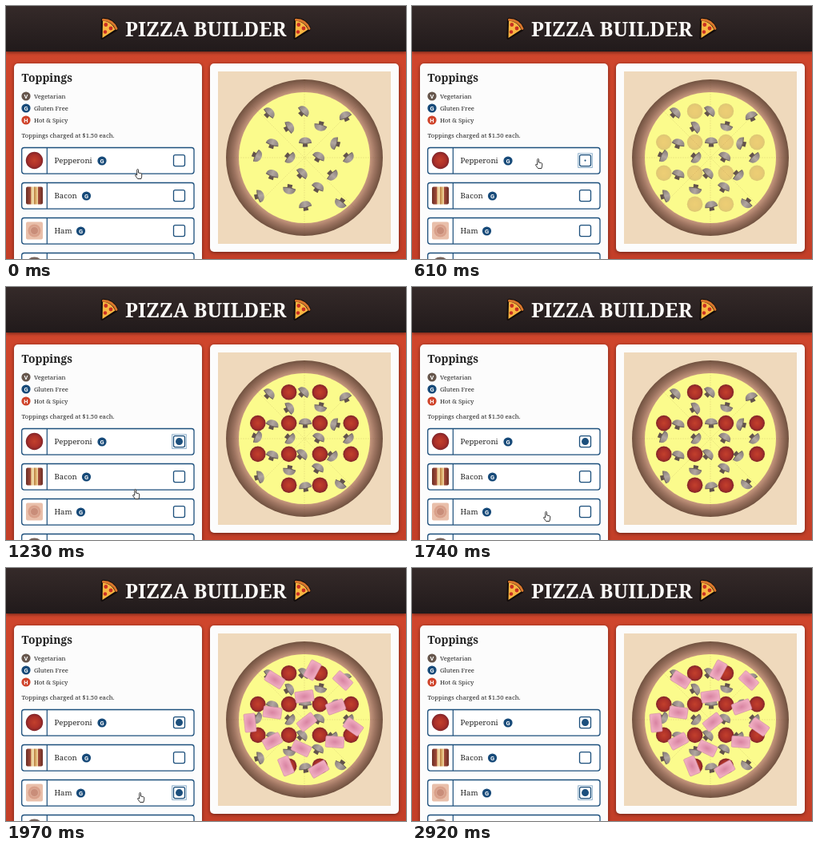
Animation, 500 px wide and 317 px high, one loop 3.33 s. Source, as an HTML page:

```html
<!DOCTYPE html>
<html lang="en">
<head>
<meta charset="utf-8">
<title>Pizza Builder</title>
<style>
  html, body { margin: 0; width: 100%; height: 100%; overflow: hidden; background: #cb432a; }
  svg { display: block; width: 500px; height: 317px; }
  text { font-family: "Noto Serif", serif; fill: #222; }
  .small { font-size: 7.7px; }
  .name { font-size: 9.6px; }
  .badge { font: bold 7.5px Roboto, sans-serif; fill: #fff; text-anchor: middle; }
  .box { fill: #fff; stroke: #1c4f7c; stroke-width: 1.3; }
  .panel { fill: #fcfcfc; filter: drop-shadow(0 1px 2px #0007); }
</style>
</head>
<body>
<svg viewBox="0 0 500 317">
  <defs>
    <linearGradient id="wall" x2="0" y2="1"><stop stop-color="#d2472d"/><stop offset="1" stop-color="#c33f28"/></linearGradient>
    <linearGradient id="bar" x2="0" y2="1"><stop stop-color="#352a29"/><stop offset="1" stop-color="#211a1b"/></linearGradient>
    <radialGradient id="crust"><stop offset=".83" stop-color="#c99a80"/><stop offset=".91" stop-color="#9c7360"/><stop offset="1" stop-color="#70513f"/></radialGradient>
    <radialGradient id="meat"><stop stop-color="#c2402c"/><stop offset=".65" stop-color="#ac3029"/><stop offset="1" stop-color="#80252a"/></radialGradient>
    <radialGradient id="pink"><stop stop-color="#d884a2"/><stop offset="1" stop-color="#efabc0"/></radialGradient>
    <linearGradient id="cap" x2="1"><stop stop-color="#857b77"/><stop offset=".5" stop-color="#b1a6a0"/><stop offset="1" stop-color="#8d837e"/></linearGradient>
    <linearGradient id="bacon">
      <stop stop-color="#6b2f27"/><stop offset=".28" stop-color="#a34a38"/><stop offset=".32" stop-color="#e8c78c"/>
      <stop offset=".45" stop-color="#f3e0b4"/><stop offset=".48" stop-color="#b8793f"/><stop offset=".58" stop-color="#d9a964"/>
      <stop offset=".7" stop-color="#eed5a0"/><stop offset=".73" stop-color="#a34a38"/><stop offset="1" stop-color="#6b2f27"/>
    </linearGradient>
    <g id="slice">
      <path d="M2 1Q15 1 20.5 13.5L19 16 1.5 26.5Q0 27 .3 25L.8 2z" fill="#120c0b" stroke="#120c0b" stroke-width="1.6" stroke-linejoin="round"/>
      <path d="M2 4Q13 5 17.5 15L1.5 25.5z" fill="#f9b642"/>
      <path d="M2.5 2.7Q14.5 3 19 13.8" fill="none" stroke="#d9772d" stroke-width="3" stroke-linecap="round"/>
      <g fill="#c92f23"><circle cx="5.8" cy="9" r="2.4"/><circle cx="12" cy="13.5" r="2.4"/><circle cx="5" cy="18" r="2.2"/></g>
    </g>
    <g id="mushroom">
      <path d="M-2.6 0H2.6L3.2 6.5H-3.2z" fill="#62524b"/>
      <path d="M-8 1.5C-8-8 8-8 8 1.5Q0 3.4-8 1.5z" fill="url(#cap)"/>
      <path d="M-8 1.3Q0 3.4 8 1.3" fill="none" stroke="#6d615b"/>
    </g>
    <circle id="pepperoni" r="9.8" fill="url(#meat)"/>
    <rect id="ham" x="-11.5" y="-7" width="23" height="14" rx="1.5" fill="url(#pink)" stroke="#cf8da4" stroke-width=".6"/>
  </defs>

  <rect width="500" height="317" fill="url(#wall)"/>
  <rect width="500" height="57" fill="url(#bar)" style="filter:drop-shadow(0 1px 2px #0008)"/>
  <use href="#slice" x="119" y="14.5"/>
  <use href="#slice" x="360" y="14.5"/>
  <text x="149" y="37.5" font-size="25" font-weight="bold" letter-spacing=".15" style="fill:#fbf9f7">PIZZA BUILDER</text>

  <rect class="panel" x="10" y="72" width="235" height="260" rx="5"/>
  <text x="19.5" y="95" font-size="13.8" font-weight="bold">Toppings</text>
  <g id="legend"></g>
  <text class="small" x="19.5" y="165">Toppings charged at $1.50 each.</text>
  <g id="rows"></g>

  <rect class="panel" x="255" y="72" width="236" height="236" rx="5"/>
  <rect x="265" y="82" width="216" height="216" fill="#efd9bc"/>
  <g transform="translate(373 190)">
    <circle r="98" fill="url(#crust)"/>
    <circle r="82" fill="#fbfb8c"/>
    <path d="M-98 0H98M0-98V98M-69-69L69 69M-69 69L69-69" stroke="#7a5a30" stroke-width=".6" stroke-dasharray="2 1" opacity=".2"/>
  </g>
  <g id="pepperoniLayer"></g>
  <g id="mushroomLayer"></g>
  <g id="hamLayer"></g>

  <path id="hand" d="M2.7 8V1.5q0-1 .9-1t.9 1V5l3.2.6q1 .2 1 1.2v2.4l-.8 3.3H3.6L.7 8.6q-.5-1 .4-1.2z" fill="#fff" stroke="#222" stroke-width=".9" stroke-linejoin="round"/>
</svg>
<script>
const $ = id => document.getElementById(id);
const BLUE = '#174a79';

const badge = (x, y, letter, color) =>
  `<circle cx="${x}" cy="${y}" r="5.6" fill="${color}"/><text class="badge" x="${x}" y="${y + 2.7}">${letter}</text>`;

$('legend').innerHTML = [['V', 'Vegetarian', '#66564c'], ['G', 'Gluten Free', BLUE], ['H', 'Hot &amp; Spicy', '#cf432a']]
  .map(([letter, label, color], i) =>
    badge(25, 113 + 15 * i, letter, color) + `<text class="small" x="35" y="${116 + 15 * i}">${label}</text>`).join('');

const tile = fill => `<rect x="25" y="5.5" width="21" height="22" rx="2" fill="${fill}"/>`;
const icons = [
  '<circle cx="35.5" cy="16.5" r="10.7" fill="url(#meat)"/>',
  tile('url(#bacon)'),
  tile('#e9bfaa') + '<circle cx="35.5" cy="16.5" r="8" fill="#d9a08a"/><circle cx="35.5" cy="16.5" r="5" fill="#c98d79" stroke="#dfb09c"/>',
  '<path d="M25 16C25 2 46 2 46 16z" fill="#75625a"/>'
];
$('rows').innerHTML = [['Pepperoni', 120], ['Bacon', 100.5], ['Ham', 93.5], ['', 0]].map(([name, badgeX], i) => `
  <g transform="translate(0 ${177 + 44 * i})">
    <rect class="box" x="19.7" y=".5" width="215.3" height="32.6" rx="3"/>
    <path d="M51.3 .5V33" stroke="#1c4f7c" stroke-width="1.2"/>${icons[i]}
    ${name && `<text class="name" x="60.5" y="20">${name}</text>` + badge(badgeX, 17, 'G', BLUE)}
    <rect id="focus${name}" x="207.7" y="7.8" width="17.6" height="17.6" fill="none" stroke="#7fa5c4" stroke-width=".9" visibility="hidden"/>
    <rect class="box" x="209.5" y="9.6" width="14" height="14" rx="2"/>
    <circle id="dot${name}" cx="216.5" cy="16.6" r="0" fill="#1c4f7c"/>
  </g>`).join('');

const place = (kind, spots) => {
  $(kind + 'Layer').innerHTML = spots.map(([x, y, turn = 0]) =>
    `<use href="#${kind}" transform="translate(${x} ${y}) rotate(${turn})"/>`).join('');
};
const grid = [-58.2, -19.4, 19.4, 58.2];
place('pepperoni', grid.flatMap(y => grid.map(x => [373 + x, 190 + y]))
  .filter(([x, y]) => Math.hypot(x - 373, y - 190) < 75));
place('mushroom', [
  [329, 134, 45], [372, 132, 45], [424, 138, -25], [354, 152, 60], [393, 151, 195],
  [374, 170, 0], [333, 172, 18], [411, 172, -75], [314, 188, 115], [355, 190, 130],
  [391, 189, 30], [428, 190, 135], [333, 211, 20], [370, 210, 45], [408, 212, 135],
  [390, 227, 30], [354, 230, 190], [317, 238, 75], [374, 250, -10], [418, 247, 215]
]);
place('ham', [
  [383, 128, -62], [336, 140, 32], [421, 141, 42], [373, 161, -8], [412, 174, -20],
  [333, 181, 8], [305, 194, 84], [376, 193, -38], [434, 199, 35], [333, 217, -28],
  [411, 218, 4], [369, 226, 25], [350, 248, 68], [391, 252, -30]
]);

const path = [
  [45, 161, 204], [290, 154, 191], [875, 154, 191], [1230, 158, 253], [1420, 160, 268],
  [1445, 160, 268], [1590, 164, 281], [2745, 164, 281], [2890, 184, 302]
];
function handAt(t) {
  const next = path.findIndex(([time]) => time > t);
  if (next < 1) return path.at(next).slice(1);
  const [t0, x0, y0] = path[next - 1], [t1, x1, y1] = path[next];
  const k = (t - t0) / (t1 - t0);
  return [x0 + (x1 - x0) * k, y0 + (y1 - y0) * k];
}

// Fades a topping in and grows the dot in its checkbox.
function check(name, kind, t, start) {
  const p = t < start ? 0 : Math.min(1, (t - start + 14) / 120);
  const shown = 1 - (1 - p) ** 2;
  $(kind + 'Layer').setAttribute('opacity', shown);
  $('dot' + name).setAttribute('r', 4.5 * shown);
}
const show = (id, on) => $(id).setAttribute('visibility', on ? 'visible' : 'hidden');

function draw() {
  const t = performance.now() % 3330;
  check('Pepperoni', 'pepperoni', t, 610);
  check('Ham', 'ham', t, 1870);
  show('focusPepperoni', t >= 610 && t < 1740);
  show('focusHam', t >= 1870);
  show('hand', t < 2920);
  $('hand').setAttribute('transform', `translate(${handAt(t)})`);
  requestAnimationFrame(draw);
}
draw();
</script>
</body>
</html>
```
